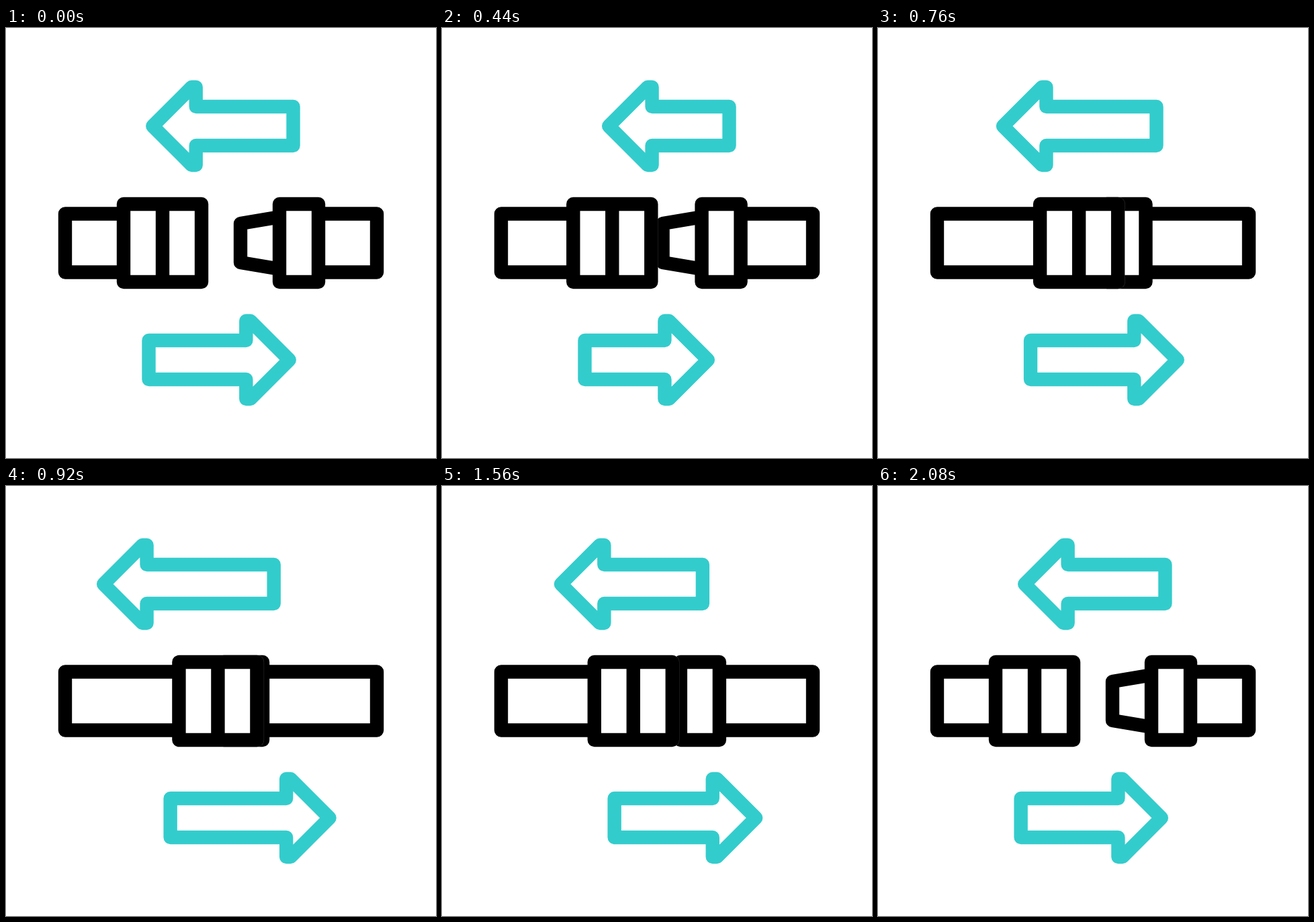
Write an HTML page that moves like this. It is 640 by 640 pixels and loops after 2160 ms.

```html
<!DOCTYPE html>
<html lang="en">
<head>
<meta charset="utf-8">
<title>Connector</title>
<style>
  html, body { margin: 0; width: 100%; height: 100%; overflow: hidden; background: #fff; }
  svg { display: block; width: 100vw; height: 100vh; }
  path { fill: none; stroke: #000; stroke-width: 20.4; stroke-linejoin: round; }
  .arrow { stroke: #3cc; }
  .filled { fill: #fff; }
  .seam { fill: #fff; stroke: #fff; stroke-opacity: .2; stroke-width: 21.4; }
</style>
</head>
<body>
<svg viewBox="0 0 640 640">
  <path id="top" class="arrow"/>
  <path id="bottom" class="arrow" transform="translate(640 348) scale(-1 1)"/>
  <path id="armL"/>
  <path id="armR"/>
  <g id="plug">
    <path d="M407 281.3 L349 291 V349 L407 358.7"/>
    <path class="filled" d="M407 262 H465 V378 H407 Z"/>
  </g>
  <g id="socket">
    <path class="seam" d="M233 262 H291 V378 H233 Z"/>
    <path class="filled" d="M175 262 H291 V378 H175 Z M233 262 V378"/>
  </g>
</svg>
<script>
const LOOP = 2160, STEP = 40, LAST = 51;
const $ = id => document.getElementById(id);

// Smooth progress from 0 to 1 between two steps; bend skews it.
function ease(n, from, to, bend = 1) {
  const u = Math.min(1, Math.max(0, (n - from) / (to - from))) ** bend;
  return u * u * (3 - 2 * u);
}

const joined = n => ease(n, 3.2, 24.8) - ease(n, 27.9, 51.2);

// The head draws back, shoots forward and returns; the tail follows late.
function drawArrow(id, n, { back, reach, pull, hit, bend }) {
  const head = 282.7 + back * ease(n, 0, 10.4)
    - (back + reach) * ease(n, 10.4, hit)
    + reach * ease(n, 26.9, 51.5, bend);
  const tail = 427.5 - pull * (ease(n, 12, 29) - ease(n, 34, 51.5));
  $(id).setAttribute("d",
    `M${tail} 117 H${head} V88 h-6.4 l-58 58 l58 58 h6.4 V175 H${tail} Z`);
}

function drawSide(part, arm, edge, end, shift) {
  $(part).setAttribute("transform", `translate(${shift} 0)`);
  $(arm).setAttribute("d", `M${edge + shift} 276.5 H${end} V363.5 H${edge + shift}`);
}

function draw(n) {
  drawSide("socket", "armL", 175, 88, 86.4 * joined(n));
  drawSide("plug", "armR", 465, 552, -87 * joined(n));
  drawArrow("top", n, { back: 30, reach: 83.8, pull: 45.7, hit: 24.7, bend: .86 });
  drawArrow("bottom", n, { back: 26, reach: 74, pull: 50.9, hit: 25.6, bend: 1.08 });
}

const start = performance.now();
function tick() {
  const t = (performance.now() - start) % LOOP;
  // The first pose lasts two steps.
  draw(Math.min(LAST, Math.max(0, Math.floor(t / STEP) - 1)));
  requestAnimationFrame(tick);
}
tick();
</script>
</body>
</html>
```
